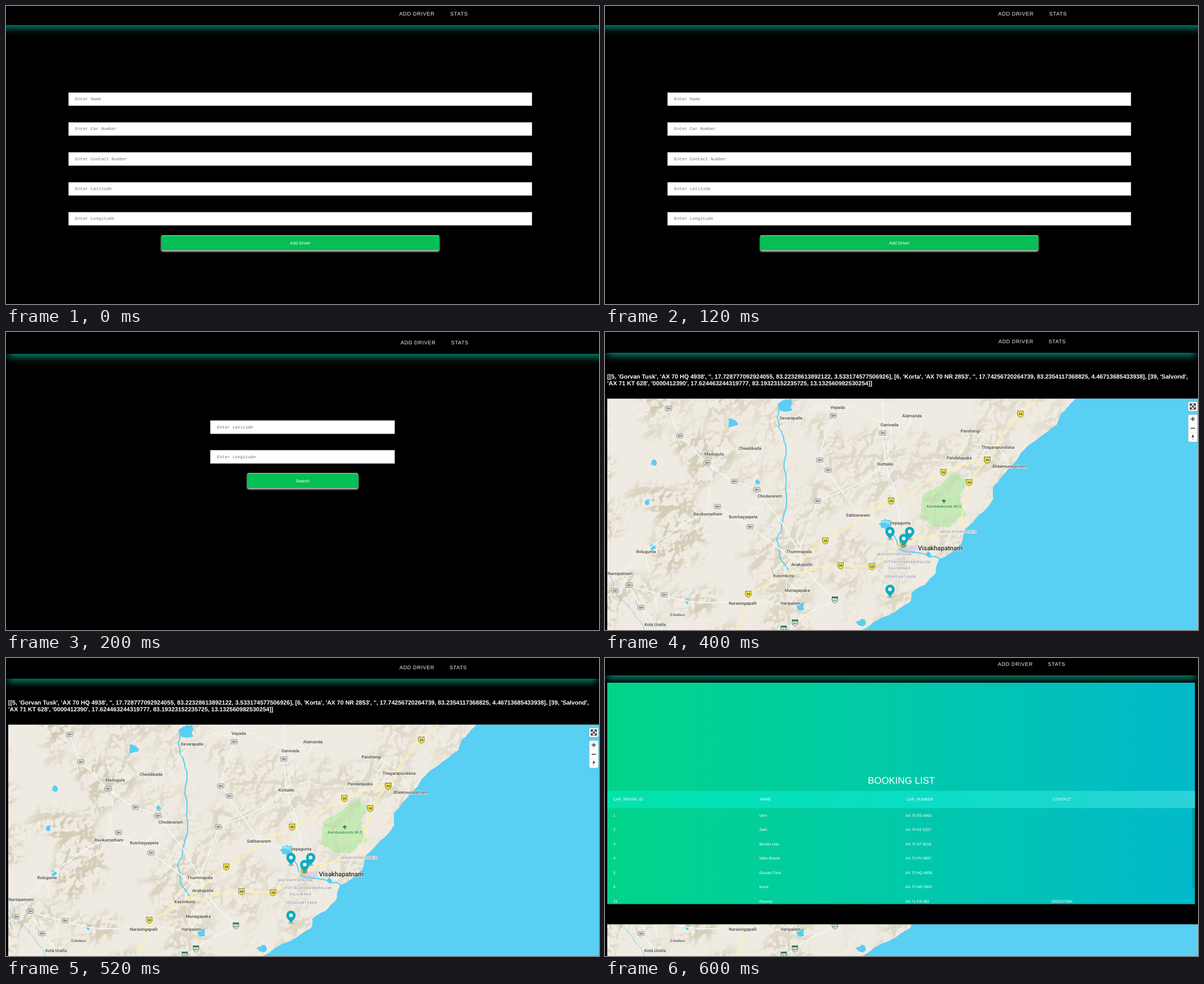
Write an HTML page that moves like this. It is 1055 px wide and 531 px high and loops after 800 ms.

```html
<!DOCTYPE html>
<html lang="en">
<head>
<meta charset="utf-8">
<title>Driver booking</title>
<style>
html, body { margin: 0; width: 100%; height: 100%; overflow: hidden; background: #000; }
svg { display: block; width: 1055px; height: 531px; }
text { font-family: "Liberation Sans", Arial, sans-serif; fill: #fff; text-rendering: geometricPrecision; white-space: pre; }
.nav { letter-spacing: .58px; fill: #f2f2f2; }
.mono { font-family: "Liberation Mono", "Courier New", monospace; fill: #757575; }
.bold { font-weight: 700; }
.mid { text-anchor: middle; }
.town { font-family: Roboto, "Open Sans", sans-serif; font-weight: 500; fill: #4b4a48; stroke: #f5f2ea; stroke-width: 1.4px; paint-order: stroke; text-anchor: middle; }
.city { fill: #222; }
.area { letter-spacing: .65px; fill: #9492b5; }
.park { fill: #2f9148; stroke: #d5efc5; }
.tag { font-weight: 700; fill: #333; text-anchor: middle; }
</style>
</head>
<body>
<svg id="stage" viewBox="0 0 1055 531">
<defs>
  <filter id="glow" x="-5%" y="-80%" width="110%" height="260%"><feGaussianBlur stdDeviation="7"/></filter>
  <filter id="soft" x="-5%" y="-50%" width="110%" height="200%"><feGaussianBlur stdDeviation="1.5"/></filter>
  <filter id="relief" x="0" y="0" width="100%" height="100%" color-interpolation-filters="sRGB">
    <feTurbulence type="fractalNoise" baseFrequency=".035" numOctaves="3" seed="4"/>
    <feDiffuseLighting surfaceScale="22" lighting-color="#fff"><feDistantLight azimuth="225" elevation="60"/></feDiffuseLighting>
    <feColorMatrix values="0 0 0 0 .77  0 0 0 0 .75  0 0 0 0 .64  -2.4 0 0 0 2" result="shade"/>
    <feTurbulence type="fractalNoise" baseFrequency=".011" numOctaves="2" seed="9"/>
    <feColorMatrix values="0 0 0 0 0  0 0 0 0 0  0 0 0 0 0  0 0 0 5 -2" result="patches"/>
    <feComposite in="shade" in2="patches" operator="in"/>
    <feComposite in2="SourceAlpha" operator="in"/>
  </filter>
  <linearGradient id="hills"><stop offset="0" stop-opacity=".8"/><stop offset=".4" stop-opacity=".45"/><stop offset="1" stop-opacity=".4"/></linearGradient>
  <linearGradient id="panel"><stop offset="0" stop-color="#02d489"/><stop offset=".5" stop-color="#01c9a9"/><stop offset="1" stop-color="#02b9cb"/></linearGradient>
  <linearGradient id="band"><stop offset="0" stop-color="#02e2ac"/><stop offset=".5" stop-color="#08dec4"/><stop offset="1" stop-color="#2cd2d9"/></linearGradient>
  <clipPath id="panelBox"><rect x="4" y="44" width="1045.5" height="394.5"/></clipPath>
  <clipPath id="mapBox"><rect x="4" y="118.5" width="1051" height="412.5"/></clipPath>
</defs>
</svg>
<script>
const NS = "http://www.w3.org/2000/svg";
const stage = document.getElementById("stage");

function add(parent, tag, attrs = {}, str) {
  const el = document.createElementNS(NS, tag);
  for (const k in attrs) el.setAttribute(k, attrs[k]);
  if (str !== undefined) el.textContent = str;
  parent.appendChild(el);
  return el;
}
const group = (p, attrs) => add(p, "g", attrs);
const box = (p, x, y, width, height, fill, more) => add(p, "rect", { x, y, width, height, fill, ...more });
const shape = (p, d, fill, more) => add(p, "path", { d, fill, ...more });
const stroke = (p, d, color, w) =>
  shape(p, d, "none", { stroke: color, "stroke-width": w, "stroke-linecap": "round", "stroke-linejoin": "round" });
const label = (p, str, x, y, size, cls = "") => add(p, "text", { x, y, class: cls, "font-size": size }, str);

let seed = 11;
const rnd = () => (seed = (seed * 16807) % 2147483647) / 2147483647;

// Path through key points, roughened by midpoint displacement
function wander(pts, rough, depth = 3) {
  for (; depth > 0; depth--)
    pts = pts.flatMap(([x, y], i) => {
      if (!i) return [[x, y]];
      const [px, py] = pts[i - 1], k = (rnd() - .5) * 2 * rough;
      return [[(x + px) / 2 + (y - py) * k, (y + py) / 2 - (x - px) * k], [x, y]];
    });
  return "M" + pts.map(p => p.map(v => v.toFixed(1))).join("L");
}

// ---------- page parts ----------
function header(p, y, x0, x1, addX, statX, size) {
  box(p, x0, y - 50, x1 - x0, 55, "#009176", { filter: "url(#glow)" });
  box(p, 0, 0, 1055, y, "#000");
  label(p, "ADD DRIVER", addX, y - 17.4, size, "nav");
  label(p, "STATS", statX, y - 17.4, size, "nav");
}
function field(p, str, x, y, w, size) {
  box(p, x + .3, y + .3, w - .6, 23.3, "#fff", { stroke: "#c4c4c4", "stroke-width": .7 });
  label(p, "Enter " + str, x + 12, y + 14.1, size, "mono");
}
function button(p, str, x, y, w) {
  box(p, x, y + 2.4, w, 26.6, "#d0d0d0", { rx: 3, filter: "url(#soft)" });
  box(p, x, y, w, 26.6, "#b9e8cb", { rx: 2.6 });
  box(p, x, y + 1, w, 25.6, "#04bf55", { rx: 2.4 });
  label(p, str, x + w / 2, y + 16.3, 7.72, "mid");
}

// ---------- map ----------
const WATER = "#58cff3";
const towns = {
  "Vepada": [414, 134], "Devarapalle": [331, 153], "Alamanda": [546, 149], "Ganivada": [506, 165],
  "Pandrangi": [650, 176], "Thagarapuvalasa": [699, 205], "Cheedikada": [258, 207], "Madugula": [194, 217],
  "Pandalapaka": [630, 224], "Kottakki": [499, 235], "Bheemunipatnam": [720, 239], "Chodavaram": [293, 292],
  "Ravikamatham": [183, 324], "Butchayyapeta": [246, 329], "Sabbavaram": [450, 326], "Vepagunta": [525, 340],
  "Rolugunta": [73, 391], "Thummapala": [345, 391], "Anakapalle": [350, 414], "Narsipatnam": [27, 430],
  "Kasimkota": [318, 434], "Munagapaka": [342, 460], "Narasingapalli": [245, 483], "Haripalem": [330, 483],
  "Kota Uratla": [89, 521]
};
const areas = { "JAGALAYANIPALEM": [628, 356], "MATHAYYAPALEM": [515, 396], "PITTALAYYAVANIPALEM": [538, 410],
  "GAJUWAKA": [524, 421], "PEDAGANTYADA": [526, 436] };

// Routes run through towns (by name) and road signs (by place)
const routes = [
  ["SH", [113, 119], [113, 136], [133, 185], [182, 233], [230, 266], [270, 281], "Thummapala"],
  ["SH", [406, 119], [406, 149], [382, 228], [397, 246], "Sabbavaram"],
  ["SH", [494, 119], [494, 180], "Kottakki", "Vepagunta"],
  ["SH", "Kottakki", [378, 301], "Thummapala"],
  ["SH", "Rolugunta", [200, 311], [258, 347], "Anakapalle"],
  ["SH", [4, 470], [18, 461], [43, 451], [105, 468], "Narasingapalli"],
  ["SH", [43, 451], [64, 491], "Kota Uratla"],
  ["157", "Anakapalle", [409, 477], [338, 518], [318, 529]],
  ["16", [768, 119], [739, 146], [680, 228], [602, 250], [509, 301], [392, 372], "Kasimkota", [255, 467], [236, 531]],
  ["16", [680, 228], [648, 268], "JAGALAYANIPALEM", [530, 378], [475, 418], [419, 416], "Kasimkota"]
];
const place = p => towns[p] || areas[p] || p;

function sign(p, kind, x, y) {
  const big = kind === "157";
  if (kind === "SH") box(p, x - 5.7, y - 3.8, 11.4, 7.6, "#fff", { rx: 1.7, stroke: "#777", "stroke-width": .9 });
  else shape(p, `M${x - 5} ${y - 5.5}q5 1.5 10 0v7.5q-1 3-5 4q-4-1-5-4Z`, big ? "#fff" : "#f8e94d",
    { stroke: big ? "#287a4b" : "#6d6837", "stroke-width": .9 });
  if (big) box(p, x - 5, y - 5.3, 10, 3, "#287a4b");
  label(p, kind, x, y + (big ? 3.3 : 2.1), big ? 5 : 5.8, "tag");
}
function lake(p, x, y, r) {
  const rim = Array.from({ length: 8 }, (_, i) => {
    const a = i * Math.PI / 4, k = r * (.6 + rnd() * .6);
    return [x + k * Math.cos(a), y + k * Math.sin(a)];
  });
  shape(p, wander(rim, .3, 1) + "Z", WATER);
}
function pin(p, x, y) {
  const g = group(p, { transform: `translate(${x} ${y})` });
  add(g, "ellipse", { rx: 5.5, ry: 2.2, opacity: .2 });
  shape(g, "M0 0C-2-4-8-8-8-13.5A8 8 0 0 1 8-13.5C8-8 2-4 0 0Z", "#0badc3", { stroke: "#098ea3", "stroke-width": .5 });
  add(g, "circle", { cy: -13.5, r: 3.2, fill: "#fff" });
}
function controls(p) {
  const edge = { rx: 2.4, stroke: "#0002" };
  box(p, 1037.5, 124.5, 16.5, 16.5, "#fff", edge);
  box(p, 1037.5, 147, 16.5, 49, "#fff", edge);
  stroke(p, "M1041 131.5v-3.5h3.5m2.5 0h3.5v3.5m0 2.5v3.5h-3.5m-2.5 0h-3.5v-3.5m0-6l9.5 9.5m0-9.5l-9.5 9.5", "#333", 1.5);
  stroke(p, "M1042.5 155h6.5m-3.25-3.2v6.4m-3.25 13.3h6.5", "#333", 1.5);
  stroke(p, "M1038 163.3h15.5m-15.5 16.4h15.5", "#ddd", .6);
  shape(p, "M1043.5 187.5l2.25-5l2.25 5Z", "#333");
  shape(p, "M1043.5 188.5l2.25 4.5l2.25-4.5Z", "#ccc");
}
// Country lanes: each town to its nearest neighbours
function lanes(p) {
  const all = Object.values(towns);
  for (const a of all) {
    const gap = b => Math.hypot(a[0] - b[0], a[1] - b[1]);
    [...all].sort((b, c) => gap(b) - gap(c)).slice(1, 3).forEach(b => stroke(p, wander([a, b], .12), "#fbfaf7", .9));
  }
}
function drawMap() {
  const m = group(stage, { "clip-path": "url(#mapBox)" });
  box(m, 4, 118, 1051, 413, "#f0ebe2");
  const park = [[622, 247], [648, 262], [632, 290], [643, 325], [615, 348], [557, 333], [567, 290], [598, 272], [622, 247]];
  shape(m, wander(park, .15), "#c6ebb7");
  shape(m, wander([[523, 383], [556, 380], [550, 396], [530, 394]], .1) + "Z", "#d8d5df");
  box(m, 4, 118, 850, 413, "url(#hills)", { filter: "url(#relief)" });

  const coast = [[838, 118], [811, 146], [804, 165], [762, 196], [722, 240], [691, 275], [691, 297], [640, 352],
    [634, 377], [594, 405], [588, 430], [545, 465], [543, 481], [490, 510], [457, 531]];
  shape(m, wander(coast, .07) + "L1055 531V118Z", WATER);
  stroke(m, wander([[310, 135], [309, 170], [322, 205], [323, 305], [305, 370], [326, 424]], .1), WATER, 2);
  stroke(m, wander([[4, 428], [30, 476], [70, 531]], .1), WATER, .9);
  stroke(m, wander([[505, 352], [525, 388], [560, 394], [600, 405]], .1), WATER, 2);
  [[322, 128, 14], [227, 163, 9], [87, 232, 7], [75, 303, 5], [85, 383, 6], [272, 268, 5], [146, 480, 5],
    [499, 342, 11], [348, 488, 8], [455, 518, 8], [575, 396, 5]].forEach(l => lake(m, ...l));

  lanes(m);
  const paths = routes.map(([kind, ...stops]) => [kind, wander(stops.map(place), .05)]);
  for (const [kind, d] of paths) stroke(m, d, kind === "16" ? "#fff" : "#dedbd7", kind === "16" ? 2.6 : 2);
  for (const [kind, d] of paths) stroke(m, d, kind === "16" ? "#f5e573" : "#fff", 1.4);
  for (const [kind, ...stops] of routes)
    for (const [x, y] of stops.filter(Array.isArray))
      if (x > 4 && y > 119 && y < 531) sign(m, kind, x, y);

  for (const s in towns) label(m, s, towns[s][0], towns[s][1] + 2.7, 7.7, "town");
  for (const s in areas) label(m, s, areas[s][0], areas[s][1] + 2.2, 6.3, "town area");
  label(m, "G.koduru", 129, 506.3, 6.5, "town");
  label(m, "Kambalakonda WLS", 603, 313.3, 6.8, "town park");
  shape(m, "M600 302.5a2 2 0 0 1 1.5-3.5a2 2 0 0 1 3.5.5a1.8 1.8 0 0 1 .5 3h-1.7v3h-1.6v-3Z", "#2f9148");
  label(m, "Visakhapatnam", 596.5, 388.5, 11.4, "town city");
  [[507, 369], [542, 369], [531.5, 381.5], [507, 472]].forEach(p => pin(m, ...p));
  controls(m);
  return m;
}

// ---------- scenes ----------
function scene(coverHeight, draw) {
  const g = group(stage);
  box(g, 0, 0, 1055, coverHeight, "#000");
  draw(g);
  return g;
}
function addDriver(g) {
  header(g, 34, -10, 1075, 699.5, 790.3, 9.3);
  ["Name", "Car Number", "Contact Number", "Latitude", "Longitude"].forEach((s, i) =>
    field(g, s, 111, 154 + i * 53.3, 825, 7.74));
  button(g, "Add Driver", 276, 408.5, 495);
}
function search(g) {
  header(g, 39, 4, 1075, 702, 791.8, 9.2);
  ["Latitude", "Longitude"].forEach((s, i) => field(g, s, 363.4, 157.6 + i * 52.9, 328.2, 7.66));
  button(g, "Search", 429, 251.3, 197.5);
}
function results(g) {
  header(g, 37, 4, 1051, 700, 789, 9.15);
  ["[[5, 'Gorvan Tusk', 'AX 70 HQ 4938', '', 17.728777092924055, 83.22328613892122, 3.533174577506926], [6, 'Korta', 'AX 70 NR 2853', '', 17.74256720264739, 83.2354117368825, 4.46713685433938], [39, 'Salvond',",
    "'AX 71 KT 628', '0000412390', 17.624463244319777, 83.19323152235725, 13.132560982530254]]"
  ].forEach((s, i) => label(g, s, 4, 82.6 + i * 12.4, 10.63, "bold"));
}
function bookings(g) {
  header(g, 31, 4, 1051, 699, 788, 9.15);
  const p = group(g, { "clip-path": "url(#panelBox)" });
  box(p, 4, 44, 1046, 395, "url(#panel)");
  label(p, "BOOKING LIST", 527.2, 224.2, 16.95, "mid");
  box(p, 4, 236.7, 1046, 30.8, "url(#band)");
  ["CAR_RENTAL ID", "NAME", "CAR_NUMBER", "CONTACT"].forEach((s, i) => label(p, s, 14.4 + i * 260.8, 254.2, 6.82));
  const rows = [
    [1, "Vem", "AX 70 BS 4863"], [2, "Sarti", "AX 70 KE 5327"], [3, "Bovelo Han", "AX 70 NT 8216"],
    [4, "Nilko Brame", "AX 70 HV 6907"], [5, "Gorvan Tusk", "AX 70 HQ 4938"], [6, "Korta", "AX 70 NR 2853"],
    [21, "Ravone", "AX 71 KS 482", "0000527964"]
  ];
  rows.forEach((row, r) => row.forEach((s, i) => label(p, s, 14.8 + i * 259.7, 282.6 + r * 25.5, 6.82)));
  box(p, 1044.7, 267.5, 4.3, 143, "#02a0ad");
}

const STEP = 200;
const map = drawMap();
const scenes = [scene(531, addDriver), scene(531, search), scene(118.5, results), scene(474.5, bookings)];
function tick() {
  const now = Math.floor(performance.now() / STEP) % scenes.length;
  scenes.forEach((s, i) => s.style.display = i === now ? "" : "none");
  map.style.display = now > 1 ? "" : "none";
  requestAnimationFrame(tick);
}
tick();
</script>
</body>
</html>
```
